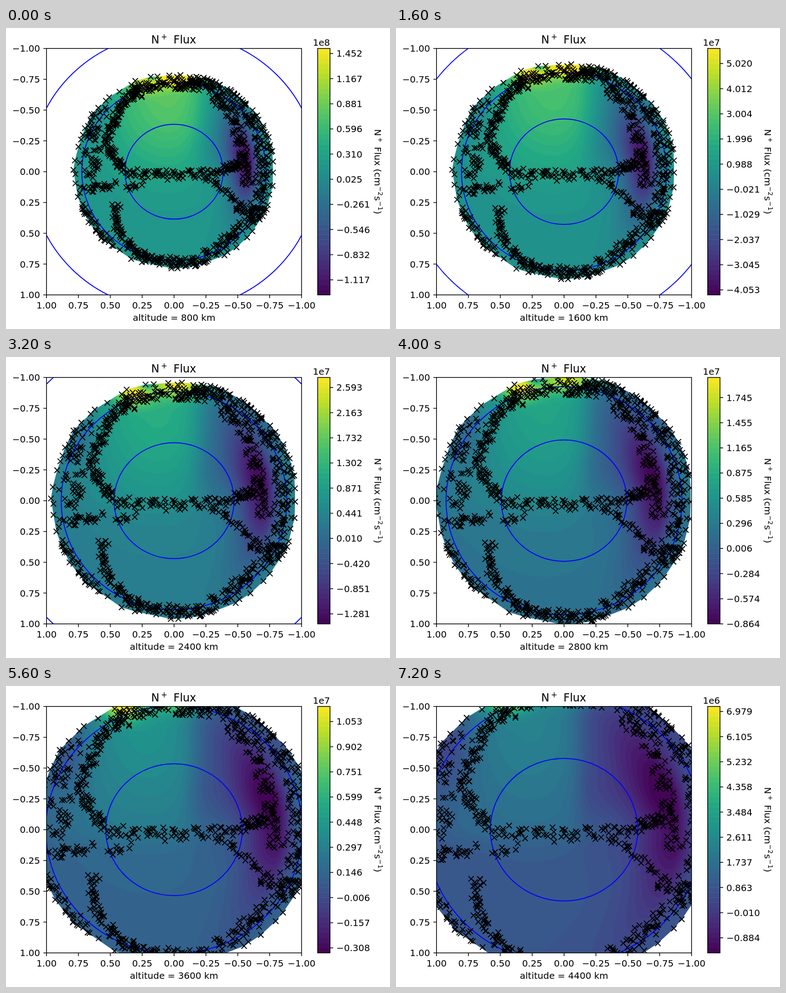
An HTML page with a canvas for the animation above (8 s loop, 845 by 662 pixels).

```html
<!DOCTYPE html>
<html lang="en">
<head>
<meta charset="utf-8">
<title>Flux by altitude</title>
<style>
html, body { margin: 0; width: 100%; height: 100%; overflow: hidden; background: #fff; }
canvas { position: absolute; left: 89px; top: 45px; }
svg { position: absolute; left: 0; top: 0; }
text { font: 20px "DejaVu Sans", sans-serif; fill: #000; white-space: pre; }
text.title { font-size: 24px; }
</style>
</head>
<body>
<canvas id="field" width="562" height="542"></canvas>
<svg id="plot" width="845" height="662" viewBox="0 0 845 662"></svg>
<script>
const STEP = 800, STEPS = 10, BANDS = 49;
const EARTH = 6371, CX = 369.8, CY = 316, HX = 280.6, HY = 271;
const LEFT = 89.2, RIGHT = 650.4, TOP = 45, BOTTOM = 587;
const svg = document.getElementById('plot');
const ctx = document.getElementById('field').getContext('2d');

// Colour range at each altitude, in units of 1e7
const low = [-12.8827, -7.3, -4.2546, -2.45, -1.45318, -0.864, -0.53447, -0.33824, -0.22, -0.14082];
const high = [15.0909, 9, 5.62486, 3.95, 2.7652, 1.9769, 1.48216, 1.14373, 0.9, 0.715373];

const stops = '440154 482475 414487 355f8d 2a788e 21918c 22a884 44bf70 7ad151 bddf26 fde725'
  .split(' ').map(h => [0, 2, 4].map(i => parseInt(h.slice(i, i + 2), 16)));
function viridis(t) {
  const p = t * 10, i = Math.min(9, Math.floor(p)), f = p - i;
  return stops[i].map((c, k) => Math.round(c + (stops[i + 1][k] - c) * f));
}
const palette = Array.from({ length: BANDS }, (_, i) => viridis((i + 0.5) / BANDS));

function add(tag, attrs, parent = svg, text) {
  const el = document.createElementNS('http://www.w3.org/2000/svg', tag);
  for (const k in attrs) el.setAttribute(k, attrs[k]);
  if (text !== undefined) el.textContent = text;
  parent.appendChild(el);
  return el;
}
const label = (x, y, anchor, text, parent) => add('text', { x, y, 'text-anchor': anchor }, parent, text);
const signed = (v, digits) => v.toFixed(digits).replace('-', '\u2212');

let seed = 20;
function random() {
  seed = (seed * 1664525 + 1013904223) % 4294967296;
  return seed / 4294967296;
}

// Orbit tracks at the lowest altitude: count, spread, then the path
const tracks = [
  [80, 15, 270, 152, 312, 130, 372, 122, 445, 126],
  [40, 18, 380, 118, 440, 124],
  [125, 11, 300, 130, 262, 160, 243, 193, 231, 225, 224, 250, 237, 287, 262, 312],
  [65, 26, 205, 185, 185, 275, 190, 330],
  [30, 10, 165, 358, 240, 345],
  [40, 10, 243, 385, 243, 440, 262, 465],
  [110, 11, 262, 468, 290, 495, 337, 513, 430, 516],
  [32, 14, 165, 395, 195, 440, 235, 478],
  [72, 11, 268, 320, 370, 324, 470, 318],
  [10, 7, 265, 355, 300, 338],
  [26, 8, 435, 328, 468, 344, 513, 388],
  [40, 10, 475, 311, 520, 300],
  [95, 13, 450, 145, 484, 176, 509, 221, 529, 300, 533, 345],
  [85, 17, 440, 118, 495, 155, 530, 185, 560, 230],
  [75, 20, 560, 235, 570, 290, 557, 385],
  [32, 10, 505, 395, 560, 405],
  [90, 15, 570, 390, 540, 425, 470, 478, 430, 510]
];

function samplePoints() {
  const out = [];
  const put = (x, y) => {
    const r = Math.hypot(x / 222, (y + 2) / 215);
    const k = r > 1 ? (0.95 + 0.05 * random()) / r : 1;
    out.push([x * k, (y + 2) * k - 2]);
  };
  for (const [count, spread, ...path] of tracks) {
    const legs = [];
    let total = 0;
    for (let i = 0; i + 3 < path.length; i += 2) {
      const [x, y, x2, y2] = path.slice(i, i + 4), len = Math.hypot(x2 - x, y2 - y);
      legs.push({ x, y, dx: x2 - x, dy: y2 - y, len });
      total += len;
    }
    for (let i = 0; i < count; i++) {
      let d = (i + random()) / count * total, j = 0;
      while (j < legs.length - 1 && d > legs[j].len) d -= legs[j++].len;
      const g = legs[j], a = random() * 2 * Math.PI, r = spread * Math.sqrt(random());
      put(g.x + g.dx * d / g.len + r * Math.cos(a) - CX, g.y + g.dy * d / g.len + r * Math.sin(a) - CY);
    }
  }
  for (let i = 0; i < 60; i++) {
    const a = (i + random() * 0.8) / 60 * 2 * Math.PI, r = 0.97 + 0.03 * random();
    put(222 * r * Math.cos(a), 215 * r * Math.sin(a) - 2);
  }
  return out;
}

function convexHull(list) {
  const sorted = [...list].sort((a, b) => a[0] - b[0] || a[1] - b[1]);
  const half = pts => {
    const h = [];
    for (const p of pts) {
      while (h.length > 1) {
        const [a, b] = h.slice(-2);
        if ((b[0] - a[0]) * (p[1] - a[1]) - (b[1] - a[1]) * (p[0] - a[0]) > 0) break;
        h.pop();
      }
      h.push(p);
    }
    return h.slice(0, -1);
  };
  return half(sorted).concat(half(sorted.reverse()));
}

const points = samplePoints(), hull = convexHull(points);

const mix = (a, b, p) => a + (b - a) * p;
const bell = (x, y) => Math.exp(-(x * x + y * y) / 2);
const sigmoid = x => 1 / (1 + Math.exp(-x));

// Normalised flux at (u, v), measured from the pole; p runs from lowest to highest altitude
function flux(u, v, p, zero) {
  let f = zero + mix(0.05, 0.1, p);
  f += mix(0.22, 0.11, p) * bell((u - mix(-10, -50, p)) / mix(100, 75, p), (v + 165) / 115);
  f += mix(0.01, 0.06, p) * sigmoid((15 - v) / 8) * sigmoid((u + 175) / 14);
  f += 0.4 * bell((u - 12) / 34, (v + 208) / 15);
  f += mix(0.25, 0.6, p) * bell((u - mix(-62, -86, p)) / 23, (v + 194) / 15);
  f -= 0.32 * bell((u + 49) / 9, (v + 212) / 9);
  f -= mix(0.08, 0.11, p) * bell((u + 165) / 22, (v + 122) / 42);
  f -= mix(0.17, 0.15, p) * sigmoid((u - mix(58, 22, p)) / mix(14, 8, p)) * sigmoid((185 - u) / 12)
    * bell(0, (v + 70) / (v < -70 ? 130 : 55));
  const du = u - 161 + mix(0.0018, 0.0028, p) * (v - 10) ** 2;
  f -= mix(0.42, 0.22, p) * bell(du / (du < 0 ? mix(28, 38, p) : 19), (v + 10) / mix(68, 100, p));
  return f;
}

function drawField(scale, p, zero) {
  const { width, height } = ctx.canvas, img = ctx.createImageData(width, height);
  for (let y = 0, k = 0; y < height; y++) {
    for (let x = 0; x < width; x++, k += 4) {
      const f = flux((x + 89.5 - CX) / scale, (y + 45.5 - CY) / scale, p, zero);
      const c = palette[Math.max(0, Math.min(BANDS - 1, Math.floor(f * BANDS)))];
      img.data[k] = c[0];
      img.data[k + 1] = c[1];
      img.data[k + 2] = c[2];
      img.data[k + 3] = 255;
    }
  }
  ctx.putImageData(img, 0, 0);
  ctx.globalCompositeOperation = 'destination-in';
  ctx.beginPath();
  for (const [x, y] of hull) ctx.lineTo(CX + x * scale - 89, CY + y * scale - 45);
  ctx.fill();
  ctx.globalCompositeOperation = 'source-over';
}

// Fixed parts
const clip = add('clipPath', { id: 'axes' });
add('rect', { x: LEFT, y: TOP, width: RIGHT - LEFT, height: BOTTOM - TOP }, clip);
const inside = add('g', { 'clip-path': 'url(#axes)', fill: 'none' });
const rings = [20, 40, 90].map(() => add('ellipse', { cx: CX, cy: CY, stroke: '#00f', 'stroke-width': 2 }, inside));
const crosses = add('path', { stroke: '#000', 'stroke-width': 2 }, inside);

const bandH = (BOTTOM - TOP) / BANDS;
palette.forEach((c, i) => add('rect', {
  x: 685.8, y: BOTTOM - (i + 1) * bandH, width: 27.2, height: bandH + (i ? 0.5 : 0), fill: `rgb(${c})`
}));
const frame = { fill: 'none', stroke: '#000', 'stroke-width': 1.6 };
add('rect', { x: LEFT, y: TOP, width: RIGHT - LEFT, height: BOTTOM - TOP, ...frame });
add('rect', { x: 685.8, y: TOP, width: 27.2, height: BOTTOM - TOP, ...frame });

for (let i = 0; i <= 8; i++) {
  const v = 1 - i / 4, x = CX - v * HX, y = CY + v * HY;
  add('path', { d: `M${x} ${BOTTOM}v7M${LEFT} ${y}h-7`, ...frame });
  label(x, 616.5, 'middle', signed(v, 2));
  label(75, y + 7.3, 'end', signed(v, 2));
}
for (const [x, y, size, s] of [[319.6, 34, 24, 'N'], [341, 25, 16.8, '+'], [368.6, 34, 24, 'Flux']]) {
  add('text', { x, y, class: 'title', style: `font-size:${size}px` }, svg, s);
}

const side = add('g', {});
for (const [x, up, s] of [[222.5, 0, 'N'], [240.2, 1, '+'], [261.5, 0, 'Flux (cm'], [348.5, 1, '\u22122'],
  [369.8, 0, 's'], [381, 1, '\u22121'], [401.8, 0, ')']]) {
  add('text', { x, y: up ? -8 : 0, style: `font-size:${up ? 14 : 20}px` }, side, s);
}
const caption = label(CX, 644, 'middle', '');
const exponent = label(713, 38.5, 'end', '');
const ticks = Array.from({ length: 10 }, () => {
  const g = add('g', {});
  add('path', { d: 'M713 0h7', ...frame }, g);
  return { g, text: label(727, 7.3, 'start', '', g) };
});

function drawScale(lo, hi) {
  const step = (hi - lo) / BANDS, first = Math.round(-lo / step) % 5;
  const values = ticks.map((_, i) => (lo + (first + 5 * i) * step) * 1e7);
  const power = Math.floor(Math.log10(Math.max(...values.map(Math.abs))));
  const unit = 10 ** power, digits = (values[9] - values[0]) / unit >= 10 ? 2 : 3;
  ticks.forEach(({ g, text }, i) => {
    g.setAttribute('transform', `translate(0 ${BOTTOM - (first + 5 * i) * bandH})`);
    text.textContent = signed(values[i] / unit, digits);
  });
  exponent.textContent = '1e' + power;
  side.setAttribute('transform', `translate(${digits === 3 ? 811 : 798.3} 0) rotate(90)`);
}

function draw(i) {
  const altitude = 800 + 400 * i, ratio = (EARTH + altitude) / EARTH;
  const scale = (EARTH + altitude) / (EARTH + 800);
  drawField(scale, i / (STEPS - 1), -low[i] / (high[i] - low[i]));
  drawScale(low[i], high[i]);
  [20, 40, 90].forEach((deg, k) => {
    const r = ratio * Math.sin(deg * Math.PI / 180);
    rings[k].setAttribute('rx', r * HX);
    rings[k].setAttribute('ry', r * HY);
  });
  crosses.setAttribute('d', points.map(([x, y]) =>
    `M${(CX + x * scale - 6).toFixed(1)} ${(CY + y * scale - 6).toFixed(1)}l12 12m0 -12l-12 12`).join(''));
  caption.textContent = `altitude = ${altitude} km`;
}

let shown = -1;
const start = performance.now();
function tick() {
  const i = Math.floor((performance.now() - start) / STEP) % STEPS;
  if (i !== shown) draw(shown = i);
  requestAnimationFrame(tick);
}
tick();
</script>
</body>
</html>
```
